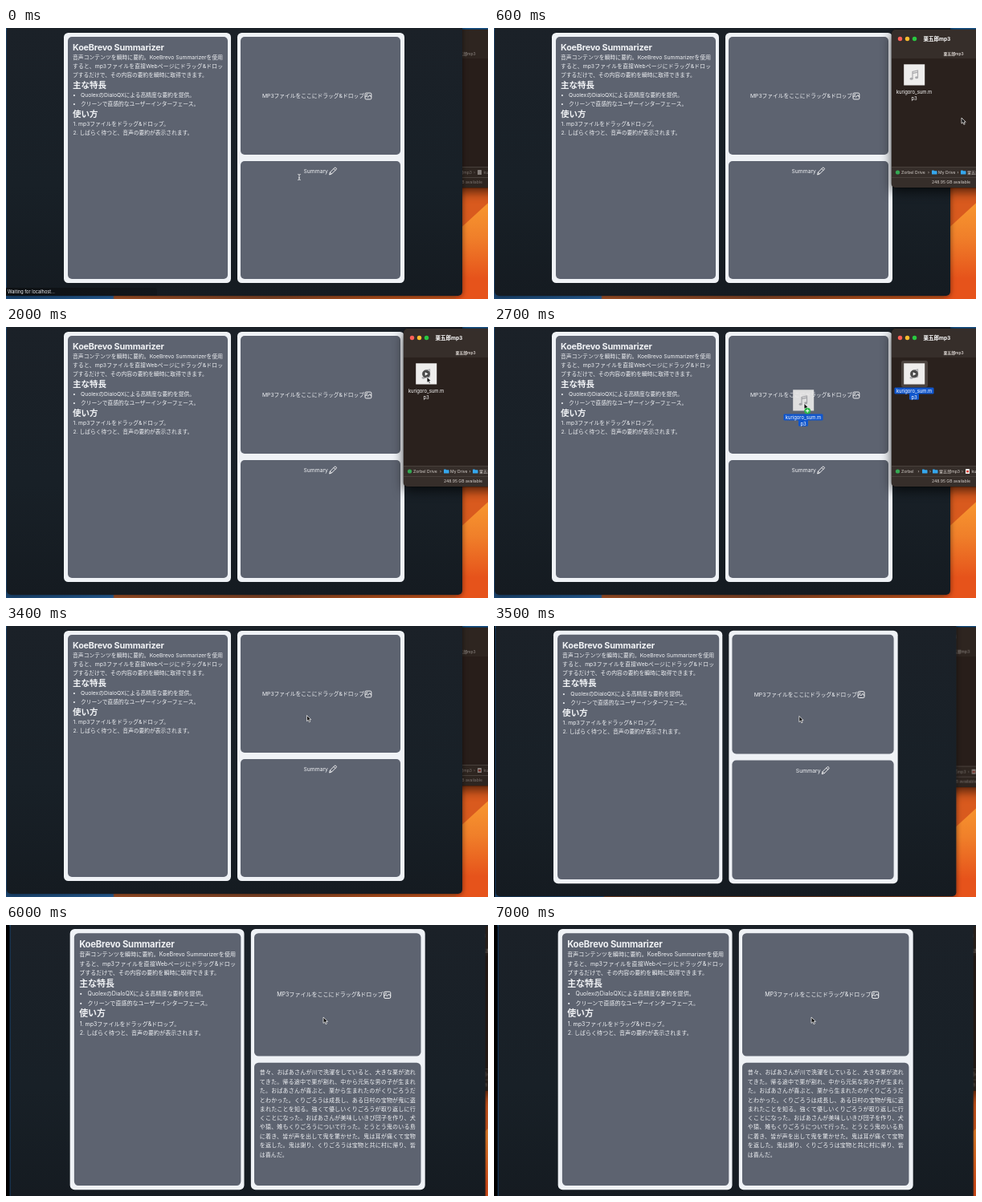
An HTML page that plays this animation: 600 px wide and 338 px high, repeating every 7300 ms.

```html
<!DOCTYPE html>
<html lang="ja">
<head>
<meta charset="utf-8">
<title>Audio summary demo</title>
<style>
html, body { margin: 0; width: 100%; height: 100%; overflow: hidden; background: #000; }
body { position: relative; font: 6.75px/10.85px Inter, "Noto Sans CJK JP", sans-serif; color: #f0f2f5; }
div, svg, p, h1, h2 { position: absolute; margin: 0; white-space: nowrap; }
svg { overflow: visible; left: 0; top: 0; }
#screen { width: 600px; height: 338px; transform-origin: 0 0; }
#desktop { left: 0; top: 0; width: 620px; height: 350px;
  background: linear-gradient(#1f5c92 3px, #0000 3px),
    linear-gradient(90deg, #1d4a78, #2a67a4 133px, #a9562a 135px, #8a4a2a 330px, #b9541f 460px, #d95a1e 580px); }
#dune { left: 560px; top: 200px; width: 60px; height: 150px; background: linear-gradient(#f7942f 15%, #f0802a 40%, #e6531b 75%);
  clip-path: polygon(0 55px, 60px 0, 60px 150px, 0 150px); }
#browser { left: 1px; top: -10px; width: 567px; height: 343.5px; border-radius: 5px;
  background: linear-gradient(#1b2128, #182027 60%, #151b21); box-shadow: 0 1px 6px #0008; z-index: 1; }
#page { left: -1px; top: 10px; }
.card { top: 6.3px; width: 208px; height: 311.5px; border-radius: 5.5px; background: #eff2f6; }
.pane { left: 4.7px; width: 198.8px; border-radius: 5px; background: #5d6370; }
h1, h2 { font-size: 10.8px; line-height: 0; left: 83px; letter-spacing: -.018em; }
h2 { font-size: 10.5px; letter-spacing: 0; }
.justify { text-align: justify; text-align-last: justify; width: 187px; }
.line { line-height: 0; }
#status { left: 0; top: 324px; width: 188px; height: 10px; font-size: 5.6px; line-height: 10px; text-indent: 2px;
  background: linear-gradient(90deg, #0d1013, #12171c); border-radius: 0 3px 0 0; }
#finder { left: 494.5px; top: 2px; width: 130px; height: 196.5px; border-radius: 5px; overflow: hidden;
  background: #2a211d; box-shadow: 0 0 0 .5px #0008, 0 5px 14px #000a; }
#finder .bar { left: 0; width: 100%; background: #362e2a; }
#finder svg { left: -494.5px; top: -2px; }
#finder.back { background: #281e1a; }
#finder.back .bar { background: #2e2520; }
#finder.back .label { opacity: .45; }
#top { z-index: 3; }
text { font-size: 5.1px; fill: #d8d2ce; dominant-baseline: central; }
.name { font-size: 5.9px; fill: #fff; text-anchor: middle; }
</style>
</head>
<body>
<div id="screen">
  <div id="desktop"><div id="dune"></div></div>

  <div id="browser"><div id="page">
    <div class="card" style="left:72.4px"><div class="pane" style="top:4.6px;height:302.3px"></div></div>
    <div class="card" style="left:287.5px">
      <div class="pane" style="top:4.6px;height:146.8px"></div>
      <div class="pane" style="top:160.2px;height:146.7px"></div>
    </div>
    <h1 style="top:24.7px">KoeBrevo Summarizer</h1>
    <p class="justify" style="left:83px;top:32px">音声コンテンツを瞬時に要約。KoeBrevo Summarizerを使用<br>すると、mp3ファイルを直接Webページにドラッグ&amp;ドロッ</p>
    <p class="line" style="left:83px;top:59px">プするだけで、その内容の要約を瞬時に取得できます。</p>
    <h2 style="top:72px">主な特長</h2>
    <p style="left:83px;top:79px">•<br>•</p>
    <p style="left:93px;top:79px">QuolexのDialoQXによる高精度な要約を提供。<br>クリーンで直感的なユーザーインターフェース。</p>
    <h2 style="top:108px">使い方</h2>
    <p style="left:83.5px;top:115.2px">1. mp3ファイルをドラッグ&amp;ドロップ。<br>2. しばらく待つと、音声の要約が表示されます。</p>

    <p class="line" style="left:319px;top:85px">MP3ファイルをここにドラッグ&amp;ドロップ</p>
    <svg fill="none" stroke="#fff" stroke-width=".9" stroke-linejoin="round">
      <rect x="447" y="81.1" width="7.8" height="7.8" rx="1.3"/>
      <path d="M447.2 86l1.9-1.2 1.6 1.5 2-2.6 2 2.4"/>
      <circle cx="449.2" cy="83.2" r=".5"/>
    </svg>
    <div id="waiting">
      <p class="line" style="left:370.5px;top:178.5px">Summary</p>
      <svg fill="none" stroke="#fff" stroke-width=".9" stroke-linejoin="round">
        <path d="M402.6 183l.8-3 5.8-5.8q.6-.5 1.2 0l.8.8q.6.6 0 1.2l-5.8 5.8zM408 175.5l2 2M403.4 180l2 2"/>
      </svg>
    </div>
    <div id="result" style="left:298.5px;top:173.2px">
      <p class="justify" style="width:186px">昔々、おばあさんが川で洗濯をしていると、大きな栗が流れ<br>てきた。帰る途中で栗が割れ、中から元気な男の子が生まれ<br>た。おばあさんが喜ぶと、栗から生まれたのがくりごろうだ<br>とわかった。くりごろうは成長し、ある日村の宝物が鬼に盗<br>まれたことを知る。強くて優しいくりごろうが取り返しに行<br>くことになった。おばあさんが美味しいきび団子を作り、犬<br>や猿、雉もくりごろうについて行った。とうとう鬼のいる島<br>に着き、皆が声を出して鬼を驚かせた。鬼は耳が痛くて宝物<br>を返した。鬼は謝り、くりごろうは宝物と共に村に帰り、皆</p>
      <p style="top:97.65px">は喜んだ。</p>
    </div>
    <div id="status">Waiting for localhost...</div>
  </div></div>

  <div id="finder">
    <div class="bar" style="top:0;height:36px"></div>
    <div class="bar" style="top:171px;height:26px;border-top:.5px solid #48403b"></div>
    <div class="bar" style="top:184px;height:.5px;background:#48403b"></div>
    <svg class="label">
      <circle cx="505.5" cy="13.5" r="2.7" fill="#ff5f57"/>
      <circle cx="514.5" cy="13.5" r="2.7" fill="#febc2e"/>
      <circle cx="523.5" cy="13.5" r="2.7" fill="#28c840"/>
      <text x="534.5" y="13.5" style="font-size:6.5px;font-weight:700;fill:#fff">栗五郎mp3</text>
      <text x="572" y="31.7" text-anchor="middle" style="font-size:4.9px;font-weight:600">栗五郎mp3</text>
      <circle cx="502.5" cy="180" r="2.6" fill="#34a853"/>
      <g id="pathFull">
        <text x="507" y="180">Zorbel Drive</text><text x="540" y="180">›</text>
        <use href="#folder" x="545" y="177.5"/><text x="553" y="180">My Drive</text><text x="576.5" y="180">›</text>
        <use href="#folder" x="581" y="177.5"/><text x="589" y="180">栗五郎mp3</text>
      </g>
      <g id="pathFile">
        <text x="507" y="180">Zorbel</text><text x="527.5" y="180">›</text>
        <use href="#folder" x="533" y="177.5"/><text x="542" y="180">›</text>
        <use href="#folder" x="546" y="177.5"/><text x="554" y="180">栗五郎mp3</text><text x="582" y="180">›</text>
        <rect x="587" y="177" width="5" height="6" rx=".6" fill="#f4efec"/>
        <rect id="fileMark" x="588" y="179" width="3" height="2.4" fill="#d8433b"/>
        <text x="594.5" y="180">kurigoro_sum.mp3</text>
      </g>
      <text x="569" y="192" text-anchor="middle">248.95 GB available</text>
    </svg>
    <svg>
      <rect id="halo" x="507" y="42" width="33" height="33" rx="2.5" fill="#4b433f"/>
      <use href="#sheet"/>
      <g id="play">
        <circle cx="523" cy="58.5" r="4.6" fill="#333d" stroke="#555" stroke-width=".8"/>
        <path d="M521.6 56.2l3.8 2.3-3.8 2.3z" fill="#fff"/>
      </g>
      <use id="blue" href="#selection"/>
      <use href="#caption"/>
    </svg>
  </div>

  <svg id="top" width="600" height="338">
    <defs>
      <g id="folder"><path d="M0 .6q0-.6.6-.6h1.8l.8.8h2.6q.7 0 .7.7v3q0 .6-.6.6h-5.3q-.6 0-.6-.6z" fill="#35a7ee"/></g>
      <g id="sheet">
        <rect x="510.2" y="45.3" width="26" height="26.2" fill="#eeedec"/>
        <path d="M521 63v-8.5l6.5-1.5v8.5M521 56.6l6.5-1.5" fill="none" stroke="#a9a9ac" stroke-width="1.2"/>
        <ellipse cx="519.6" cy="63.2" rx="2" ry="1.5" fill="#a9a9ac"/>
        <ellipse cx="526.1" cy="61.7" rx="2" ry="1.5" fill="#a9a9ac"/>
      </g>
      <g id="selection" fill="#1156cc">
        <rect x="498.5" y="75.4" width="49" height="8.2" rx="1.4"/>
        <rect x="517" y="82.5" width="12" height="8.3" rx="1.4"/>
      </g>
      <g id="caption">
        <text class="name" x="523" y="79.5">kurigoro_sum.m</text>
        <text class="name" x="523" y="87.2">p3</text>
      </g>
    </defs>
    <g id="ghost">
      <use href="#sheet" opacity=".9"/><use href="#selection"/><use href="#caption"/>
    </g>
    <g id="cursor">
      <path id="arrow" d="M0 0v7.2l1.7-1.5 1.2 2.7 1.3-.6-1.2-2.6h2.3z" fill="#111" stroke="#fff" stroke-width=".7"/>
      <path id="beam" d="M-1.8-3.6q1.8 0 1.8 1.2q0-1.2 1.8-1.2M0-2.6v5.2M-1.8 3.6q1.8 0 1.8-1.2q0 1.2 1.8 1.2M-1 .8h2" fill="none" stroke="#fff" stroke-width=".7"/>
      <g id="badge">
        <circle cx="4.2" cy="9.3" r="3.9" fill="#2bb84a"/>
        <path d="M2 9.3h4.4M4.2 7.1v4.4" stroke="#fff" stroke-width="1"/>
      </g>
    </g>
  </svg>
</div>
<script>
const LOOP = 7300, GRAB = [524, 62.3];
const ZOOM = { scale: 1.0425, x: 4.6, y: -1.3 };
// Pointer stops: time, x, y
const stops = [
  [0, 365, 186], [100, 365, 186], [500, 582, 112], [600, 582, 112], [1000, 541.5, 86],
  [1100, 541.5, 86], [1700, ...GRAB], [2100, ...GRAB], [2700, 386, 95.3], [3000, 386, 95.3],
  [3300, 374.5, 111.5], [LOOP, 374.5, 111.5]
];
const el = id => document.getElementById(id);
const show = (id, on) => el(id).style.display = on ? '' : 'none';
const clamp = v => Math.max(0, Math.min(1, v));
const ease = v => v * v * (3 - 2 * v);

function pointerAt(t) {
  const i = stops.findIndex(s => s[0] > t);
  const [t0, x0, y0] = stops[i - 1], [t1, x1, y1] = stops[i];
  const k = ease((t - t0) / (t1 - t0));
  return [x0 + (x1 - x0) * k, y0 + (y1 - y0) * k];
}

function draw(t) {
  const [x, y] = pointerAt(t);
  const front = t >= 600 && t < 3300;
  const dragging = t >= 2100 && t < 3200;
  const selected = t < 600 || t >= 2100;
  const zoom = ease(clamp((t - 3400) / 300));

  el('screen').style.transform =
    `translate(${ZOOM.x * zoom}px, ${ZOOM.y * zoom}px) scale(${1 + (ZOOM.scale - 1) * zoom})`;
  el('finder').style.zIndex = front ? 2 : 0;
  el('finder').classList.toggle('back', !front);
  el('status').style.opacity = 1 - clamp((t - 100) / 300);
  el('cursor').setAttribute('transform', `translate(${x} ${y})`);
  el('ghost').setAttribute('transform', `translate(${x - GRAB[0]} ${y - GRAB[1]})`);

  show('pathFull', !selected);
  show('pathFile', selected);
  show('fileMark', t >= 2100);
  show('halo', selected);
  show('blue', selected);
  show('play', t >= 1500);
  show('ghost', dragging);
  show('badge', dragging && x < 491);
  show('beam', t < 200);
  show('arrow', t >= 200);
  show('waiting', t < 4800);
  show('result', t >= 4800);
}

function tick() {
  draw(Math.floor(performance.now() % LOOP / 100) * 100);
  requestAnimationFrame(tick);
}
tick();
</script>
</body>
</html>
```
